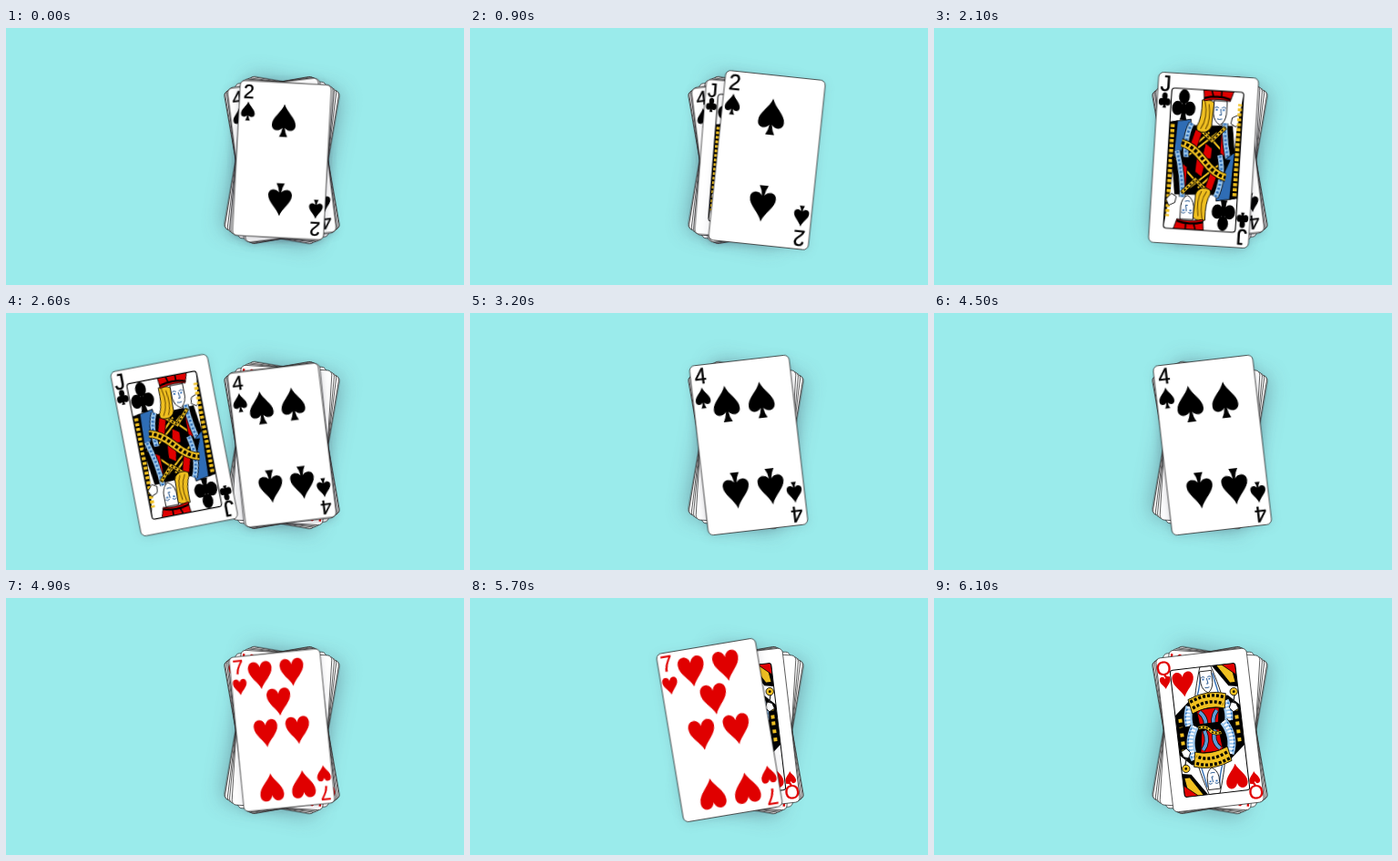
An HTML page that plays this animation: 503 by 282 pixels, repeating every 8 s.

```html
<!DOCTYPE html>
<html>
<head>
<meta charset="utf-8">
<style>
html, body { margin: 0; height: 100%; overflow: hidden; background: #9aebeb; }
svg { display: block; width: 100vw; height: 100vh; }
text { font: 21.5px "Liberation Sans", Arial, sans-serif; text-anchor: middle; }
.top { filter: drop-shadow(0 2px 5px rgba(50,50,73,.13)); }
.base { filter: drop-shadow(0 1px 12px rgba(50,50,73,.42)); }
</style>
</head>
<body>
<svg id="stage" viewBox="0 0 503 282">
  <clipPath id="frame"><rect x="-36" y="-70" width="72" height="140" rx="3"/></clipPath>
</svg>
<script>
const stage = document.getElementById('stage');
const RED = '#e00000', BLACK = '#000', GOLD = '#f0c020', BLUE = '#2f6db5', SKY = '#9cc8ee';

const suits = {
  S: 'M0-18C3-9 13-3 13 5C13 12 5 13 1.2 8Q2 14 4.5 18H-4.5Q-2 14-1.2 8C-5 13-13 12-13 5C-13-3-3-9 0-18Z',
  H: 'M0 16C-3 8-13 2-13-7C-13-16-2-17 0-8C2-17 13-16 13-7C13 2 3 8 0 16Z',
  C: 'M-6-9a6 8 0 1 1 12 0a6 8 0 1 1-12 0M-13 4a6.2 8 0 1 1 12.4 0a6.2 8 0 1 1-12.4 0' +
     'M.6 4a6.2 8 0 1 1 12.4 0a6.2 8 0 1 1-12.4 0M-1.5-4H1.5Q2 14 4 17H-4Q-2 14-1.5-4Z'
};
const ink = suit => suit === 'H' ? RED : BLACK;

const shape = (d, fill, more = '') => `<path d="${d}" fill="${fill}" ${more}/>`;
const line = (d, color, width = 1, dash = '') =>
  `<path d="${d}" fill="none" stroke="${color}" stroke-width="${width}" stroke-dasharray="${dash}"/>`;
const band = (d, width, back, front, dash) =>
  line(d, BLACK, width + 1.4) + line(d, back, width) + line(d, front, width * .5, dash);
const edge = 'stroke="#000" stroke-width=".8"';
const pip = (suit, x, y, size = 1, flip = false) =>
  shape(suits[suit], ink(suit), `transform="translate(${x} ${y}) rotate(${flip ? 180 : 0}) scale(${size})"`);
const both = art => art + `<g transform="rotate(180)">${art}</g>`;

const face = (x, y) => `<g transform="translate(${x} ${y})">` +
  shape('M-6-11H7V2Q6 10 1 13Q-5 10-6 2Z', '#fff', edge) +
  line('M-5-4Q-3-6-1-4M2-4Q4-6 6-4M1-3L2 3H0M-2 7Q0 8 3 7', '#1c4f8a', .9) +
  line('M-4-2H-2M3-2H5', BLUE, 1.6) + '</g>';

const jack = both(
  shape('M-36-36L-15-40L-12-6L-36 14Z', BLUE, edge) +
  shape('M-36-36L-28-38L-31 30L-36 70Z', BLACK) +
  line('M-33-34L-33 58', GOLD, 4, '3 2') +
  shape('M-13-34L27-36L32 2H-27Z', BLACK) +
  line('M-14-10L4-28M-20 0L12-28M22-6L6-22M28 0L8-20', GOLD, 1.8) +
  shape('M-10-30L-3-28L-8-10L-15-12Z', RED, edge) +
  shape('M16-28L23-30L24-2L16-8Z', RED, edge) +
  shape('M1-17L8-12L7 2L-2-2Z', RED, edge) +
  band('M-14-36Q-22-18-16 6', 5, SKY, BLUE, '2 2') +
  band('M19-38Q20-16 27 8', 5, SKY, BLUE, '2 2') +
  band('M-7-32L7-20L20-34', 3, GOLD, BLACK, '2 2') +
  shape('M-5-60Q1-62 7-58L6-38Q7-31 0-28Q-10-27-9-33Q-4-42-5-60Z', GOLD, edge) +
  line('M-2-58Q2-42-5-31M2-56Q5-40 0-31', '#6b4a00', 1) +
  face(13, -49) +
  shape('M-4-70H26L23-60Q10-63-3-59Z', RED, edge) +
  line('M-3-62Q10-66 23-62', BLACK, 2) +
  line('M4-70L6-64M14-70V-64', BLACK, 1.5) +
  shape('M26-44l6-3l3 6l-5 6l-5-3Z', '#fff', edge)
) + band('M-23-16Q-12-14 0 0T23 16', 7, GOLD, BLACK, '3 2');

const queen = both(
  shape('M-36-20L-17-36L24-36L36-24V6L10 8H-36Z', BLACK) +
  line('M-31-16V8M31-22V4', GOLD, 4, '4 5') +
  band('M-19-28Q-27-10-16 8', 9, SKY, '#fff', '2 2') +
  band('M20-30Q27-12 16 6', 9, SKY, '#fff', '2 2') +
  line('M-22-26Q-30-10-19 8M23-28Q30-12 19 6', BLUE, 1.5, '2 2') +
  shape('M-12-24H13L9 0H-10Z', RED, edge) +
  line('M-9-21Q0-12-6 0M10-21Q2-12 6 0', BLACK, 5) +
  line('M-9-21Q0-12-6 0M10-21Q2-12 6 0', '#5b9bd5', 3.6) +
  shape('M-3-70H9Q15-50 17-38H-12Q-9-52-3-70Z', '#fff', edge) +
  line('M-3-64Q-5-50-9-40M10-62Q12-50 14-40', BLUE, 1.4) +
  face(2, -54) +
  shape('M10-70H36V-44L26-46Z', BLACK) +
  shape('M15-70H31L34-49L28-49Z', GOLD, edge) +
  shape('M21-70H36V-57Z', RED, edge) +
  shape('M-20-36Q2-45 22-38L19-22Q2-28-17-20Z', GOLD, edge) +
  line('M-18-33Q3-42 20-34M-16-26Q3-35 18-27', BLACK, 3.4, '3 2') +
  line('M32-38L27-18', '#333', 1.4) +
  `<circle cx="31" cy="-39" r="4.2" fill="${GOLD}" ${edge}/><circle cx="31" cy="-39" r="1.4"/>` +
  shape('M27-28l5 2l2 6l-6 3l-4-5Z', '#fff', edge)
) + band('M-12-4Q-3-5 0 0T12 4', 3, GOLD, BLACK, '2 2');

function court(art, suit) {
  return `<g clip-path="url(#frame)">${art}${both(pip(suit, -23, -54, .9))}</g>` +
    '<rect x="-36" y="-70" width="72" height="140" rx="3" fill="none" stroke="#000"/>';
}

const spots = (suit, list) => list.map(([x, y]) => pip(suit, x, y, 1, y > 5)).join('');
const corners = (rank, suit, x, y = -52, size = .58) => both(
  `<text x="${x}" y="-66" fill="${ink(suit)}" stroke="${ink(suit)}" stroke-width=".3">${rank}</text>` +
  pip(suit, x, y, size));
const courtCorners = (rank, suit) => corners(rank, suit, -42.5, -57.5, .45);

function addCard(rot, art = '', cls = '') {
  const g = document.createElementNS('http://www.w3.org/2000/svg', 'g');
  g.innerHTML = `<rect x="-50" y="-85" width="100" height="170" rx="5" fill="#fff" stroke="#222" stroke-width=".7"/>` + art;
  g.setAttribute('class', cls);
  stage.append(g);
  const card = { g, rot };
  place(card, 0, 1);
  return card;
}

function place({ g, rot }, x, scale) {
  const turn = rot + .13 * Math.max(-150, Math.min(150, x));
  g.setAttribute('transform', `translate(${303 + x} 145) rotate(${turn}) scale(${scale})`);
}

// Pile, bottom to top
addCard(10, '', 'base');
[-10, 9.4, -9.2, 7.2, -7.8, 5.5, -1].forEach(r => addCard(r));
addCard(3.5, courtCorners('K', 'H'));
addCard(-6.7, courtCorners('Q', 'H') + court(queen, 'H'));
const seven = addCard(-5.7, corners('7', 'H', -41) +
  spots('H', [[-17.5, -63], [17.5, -63], [0, -32], [-17.5, 1], [17.5, 1], [-17.5, 62], [17.5, 62]]), 'top');
const four = addCard(-7, corners('4', 'S', -40) +
  spots('S', [[-17.5, -43.5], [17.5, -43.5], [-17.5, 43.5], [17.5, 43.5]]), 'top');
const jackCard = addCard(4.5, courtCorners('J', 'C') + court(jack, 'C'), 'top');
const two = addCard(3, corners('2', 'S', -40) + spots('S', [[0, -43.5], [0, 43.5]]), 'top');

// Each drag: card, grab time, release time, distance pulled, curve, throw direction (0 = springs back)
const drags = [
  [two, 450, 1210, 66, 2, 1],
  [jackCard, 1850, 2560, -56, 2, -1],
  [four, 2850, 3600, 30, 3, 0],
  [four, 4150, 4690, 10, 3, 1],
  [seven, 5250, 5840, -50, 2, -1]
];

function drawDrag(t, [card, grab, release, pull, power, dir]) {
  if (t < grab) return;
  const lift = 1 - Math.exp((grab - t) / 50);
  if (t < release) {
    place(card, pull * ((t - grab) / (release - grab)) ** power, 1 + .1 * lift);
    return;
  }
  const s = (t - release) / 1000;
  const spring = rate => (1 + rate * s) * Math.exp(-rate * s);
  // Overdamped spring for a throw
  const fly = 1 - 1.107 * Math.exp(-4.4 * s) + .107 * Math.exp(-45.6 * s);
  place(card, dir ? pull + dir * 700 * fly : pull * spring(13), 1 + .1 * spring(20));
}

function draw(now) {
  const t = Math.floor(now % 8000 / 100) * 100;
  [two, jackCard, four, seven].forEach(c => place(c, 0, 1));
  drags.forEach(d => drawDrag(t, d));
}

const start = performance.now();
function tick() {
  draw(performance.now() - start);
  requestAnimationFrame(tick);
}
tick();
</script>
</body>
</html>
```
